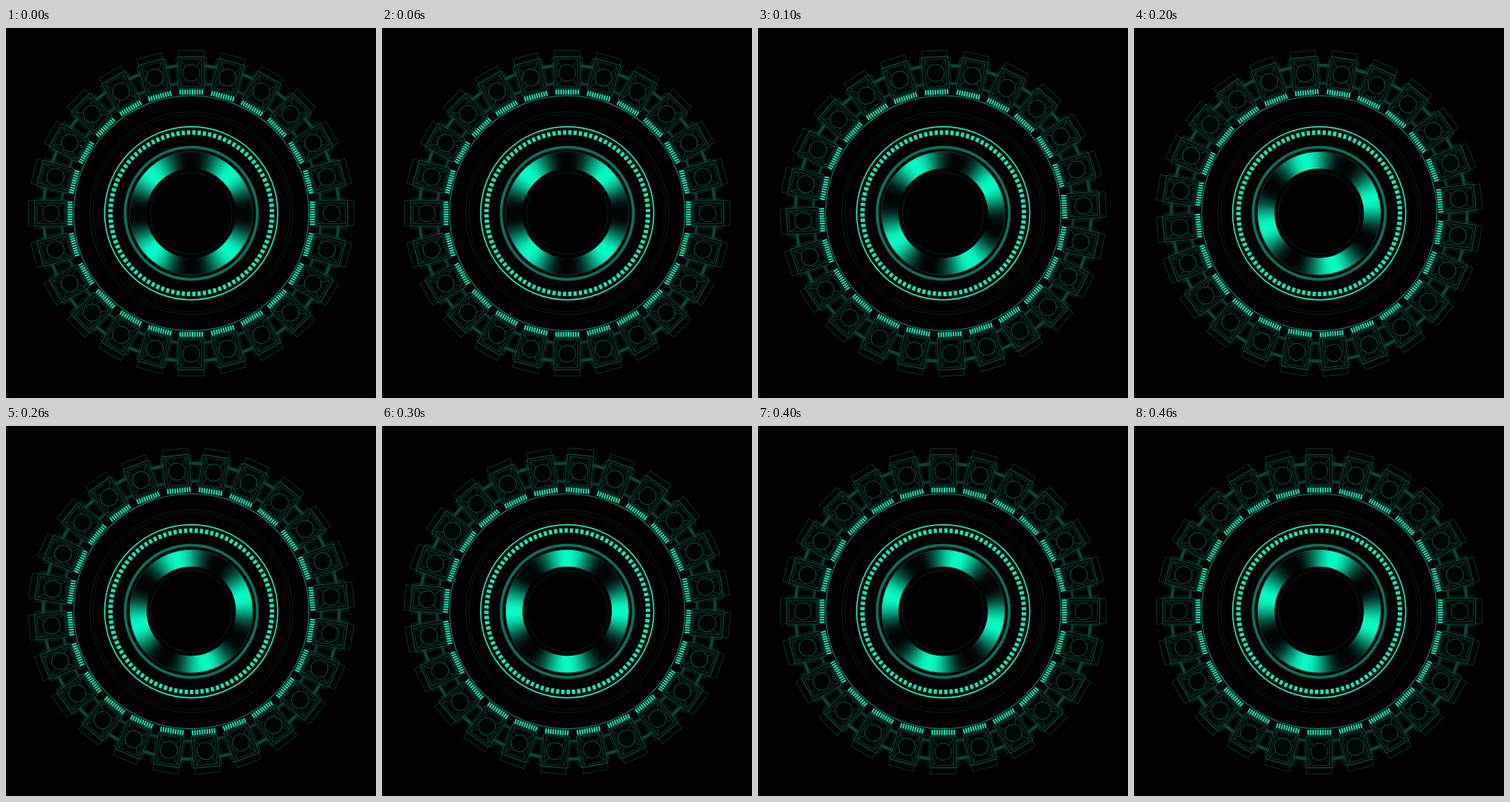
Recreate the animation shown at these times as an HTML page with a canvas. Size 498x498 px, loop 500 ms.

```html
<!DOCTYPE html>
<html lang="en">
<head>
<meta charset="utf-8">
<title>Rotating dial</title>
<style>
  html, body { margin: 0; width: 100%; height: 100%; overflow: hidden; background: #030104; }
  canvas { display: block; width: 498px; height: 498px; }
</style>
</head>
<body>
<canvas id="stage" width="498" height="498"></canvas>
<script>
const ctx = document.getElementById('stage').getContext('2d');
const TAU = Math.PI * 2;
const RAD = Math.PI / 180;
const MID = 249.3;
const BACK = '#030104';
const STEP = 100;
const MODULES = 24;
const DASHES = 96;

// Gear pose held during each step, in degrees.
const gearTurn = [0, -3.1, -5.85, -10.1, -15];

function ring(r, width, color) {
  ctx.beginPath();
  ctx.arc(0, 0, r, 0, TAU);
  ctx.lineWidth = width;
  ctx.strokeStyle = color;
  ctx.stroke();
}

function box(x, y, w, h, color) {
  ctx.lineWidth = 1;
  ctx.strokeStyle = color;
  ctx.strokeRect(x, y, w, h);
}

function line(x1, y1, x2, y2, color, width = 1) {
  ctx.beginPath();
  ctx.moveTo(x1, y1);
  ctx.lineTo(x2, y2);
  ctx.lineWidth = width;
  ctx.strokeStyle = color;
  ctx.stroke();
}

// Calls draw(i) in n evenly turned frames, the first pointing up.
function around(n, start, draw) {
  for (let i = 0; i < n; i++) {
    ctx.save();
    ctx.rotate(start + i * TAU / n);
    draw(i);
    ctx.restore();
  }
}

function connector() {
  ctx.rotate(TAU / MODULES / 2);
  line(-10, -199, 10, -199, '#0a4639', 4.5);
  line(-8, -175, 8, -175, '#08392f', 4);
  ctx.fillStyle = '#010202';
  ctx.beginPath();
  ctx.arc(0, -163, 5, 0, TAU);
  ctx.fill();
}

function module() {
  box(-17, -219, 34, 8, '#09362d');
  box(-20.5, -209, 41, 7, '#083028');
  ctx.fillStyle = '#020504';
  ctx.fillRect(-18, -211, 36, 43);
  box(-17.5, -210.5, 35, 42.5, '#0b5546');
  box(-14, -207.5, 28, 37, '#093f34');
  for (const side of [-1, 1]) {
    line(side * 20, -205, side * 20, -173, '#083028');
    line(side * 14, -207, side * 8, -198, '#093f34');
    line(side * 14, -171, side * 8, -180, '#093f34');
  }
  ctx.beginPath();
  ctx.arc(0, -189, 11.5, 0, TAU);
  ctx.lineWidth = 1;
  ctx.strokeStyle = '#0b5546';
  ctx.stroke();
  ctx.fillStyle = '#19e2b3';
  for (let i = 0; i < 10; i++) ctx.fillRect(-15.9 + i * 3.3, -166.5, 2.1, 6.8);
}

function shine(turn) {
  const grad = ctx.createConicGradient(turn - Math.PI / 2, 0, 0);
  const n = 96;
  for (let i = 0; i <= n; i++) {
    const v = Math.pow(Math.cos(2 * TAU * i / n) ** 2, 1.3);
    grad.addColorStop(i / n, `rgb(${3 + 5 * v},${4 + 246 * v},${6 + 190 * v})`);
  }
  ring(71.7, 23.2, grad);
}

function render(now) {
  const pose = Math.floor(now / STEP) % gearTurn.length;
  const gear = gearTurn[pose] * RAD;

  ctx.setTransform(1, 0, 0, 1, 0, 0);
  ctx.fillStyle = BACK;
  ctx.fillRect(0, 0, 498, 498);
  ctx.translate(MID, MID);

  around(MODULES, gear, connector);
  around(MODULES, gear, module);
  ring(158.3, 1.1, '#0f8a70');

  ring(136.5, 1, '#07221d');
  ring(132.5, 1, '#061a17');
  ring(116.5, 1.7, '#1ce5b6');
  ctx.fillStyle = '#18e6b6';
  around(DASHES, gear + TAU / DASHES / 2, () => ctx.fillRect(-2.2, -111.7, 4.4, 6));
  ring(89, 3.8, '#08725b');

  shine((pose * 15 - 45) * RAD);
  ring(83, 1, '#0a3a30');
  ring(55, 1, '#08261f');
}

const begin = performance.now();
function tick() {
  render(performance.now() - begin);
  requestAnimationFrame(tick);
}
tick();
</script>
</body>
</html>
```
